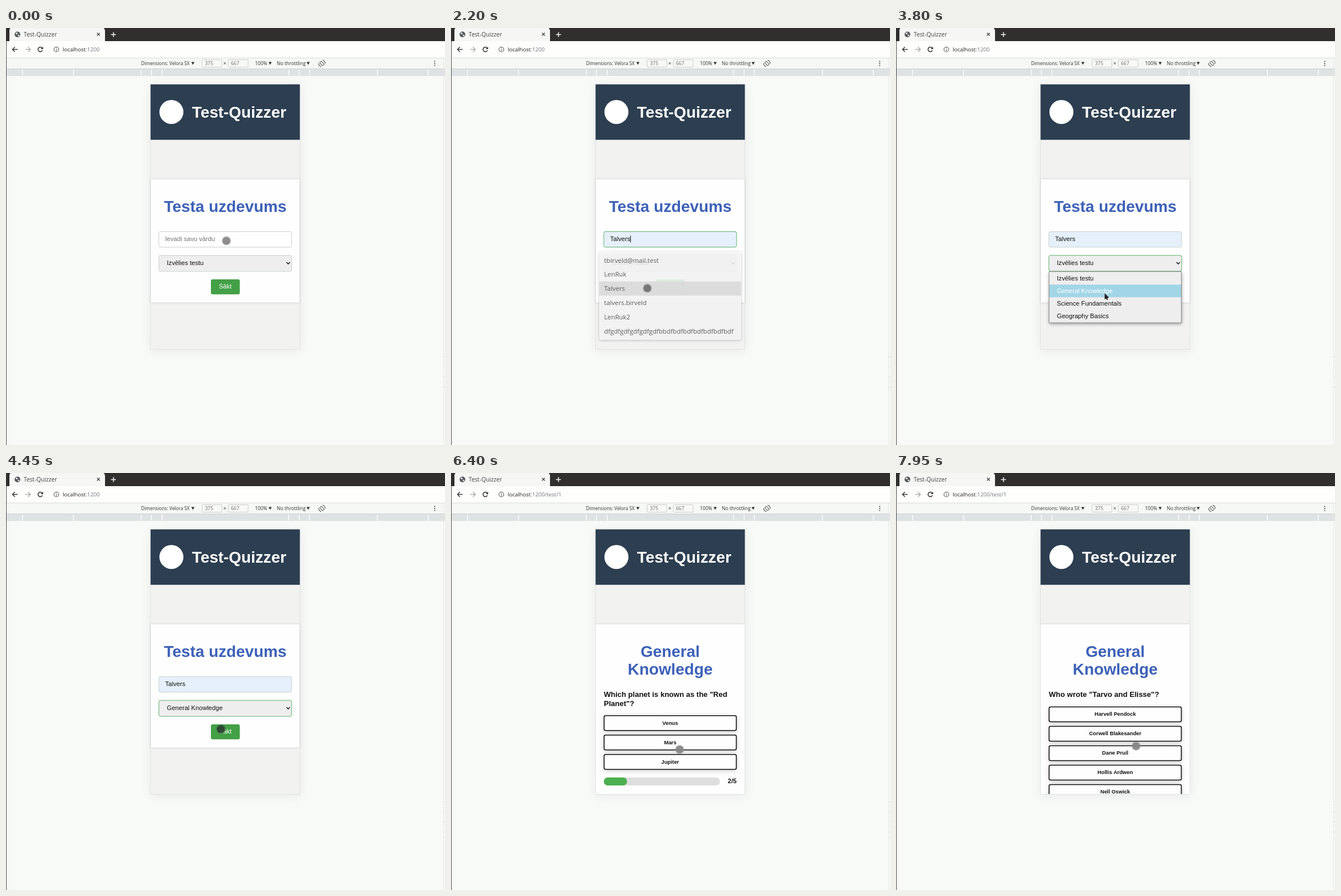
These frames come from a looping animation (767 px wide and 730 px high, 8 s). An HTML page with a canvas:

```html
<!DOCTYPE html>
<html lang="lv">
<head>
<meta charset="utf-8">
<title>Test-Quizzer</title>
<style>
html, body { margin: 0; width: 100%; height: 100%; overflow: hidden; background: #f8faf7; }
canvas { display: block; }
</style>
</head>
<body>
<canvas id="stage" width="767" height="730"></canvas>
<script>
const ctx = document.getElementById('stage').getContext('2d');
const LOOP = 8000, STEP = 50, PRESS = 150;
const W = 767, H = 730, MID = 383;
const LEFT = 267, WIDE = 232;
const EM = 11.12;
const NAME_ROW = 24.85, TEST_ROW = 22.2, ANSWER_ROW = 34;
const PAGE = '"Liberation Sans", Arial, sans-serif';
const UI = '"Open Sans", "Noto Sans", sans-serif';
const INK = '#111', ICON = '#444', WHITE = '#fefefe';
const GREY = [204, 208, 208], FOCUS = [92, 176, 108], SKY = [162, 214, 231], PALE = [238, 238, 238];

const USER = 'Talvers';
const NAMES = ['tbirveld@mail.test', 'LenRuk', USER, 'talvers.birveld', 'LenRuk2',
  'dfg'.repeat(5) + 'dfbb' + 'dfb'.repeat(6) + 'df'];
const TESTS = ['Izvēlies testu', 'General Knowledge', 'Science Fundamentals', 'Geography Basics'];
const QUIZ = [
  { ask: ['What is the capital of France?'], answers: ['Berlin', 'Madrid', 'Paris', 'Rome'] },
  { ask: ['Which planet is known as the "Red', 'Planet"?'], answers: ['Venus', 'Mars', 'Jupiter'] },
  { ask: ['Who wrote "Tarvo and Elisse"?'],
    answers: ['Harvell Pendock', 'Corwell Blakesander', 'Dane Pruil', 'Hollis Ardwen', 'Nell Oswick'] }
];

// Moments of the story, in ms
const T = { focus: 550, pick: 2150, open: 2750, hover: 3800, choose: 4000, go: 4400,
  quiz: 4600, answer: 6050, second: 6400, third: 7550 };

const clamp = v => Math.max(0, Math.min(1, v));
const ramp = (t, from, length) => clamp((t - from) / length);
const ease = k => k * k * (3 - 2 * k);
const mix = (a, b, k) => `rgb(${a.map((v, i) => Math.round(v + (b[i] - v) * k))})`;

// Each move runs along a slightly bowed line to the next resting place
function pointerAt(t) {
  let p = { x: 385, y: 372.5 };
  const move = (from, length, x, y) => {
    const k = ease(ramp(t, from, length)), bow = 0.15 * Math.sin(Math.PI * k);
    const dx = x - p.x, dy = y - p.y;
    p = { x: p.x + dx * k + dy * bow, y: p.y + dy * k - dx * bow };
  };
  move(0, 200, 392, 374);
  move(1100, 450, 343, 455.5);
  move(2350, 250, 357, 421);
  move(2950, 450, 349, 459);
  move(3600, 250, 366, 466);
  move(4150, 300, 375.5, 448.5);
  move(5000, 350, 398, 422.5);
  move(5350, 450, 399.5, 484);
  move(6550, 250, 410, 456);
  move(6900, 350, 399.5, 475);
  move(7700, 250, 419.5, 478);
  return p;
}

function rect(x, y, w, h, color) {
  ctx.fillStyle = color;
  ctx.fillRect(x, y, w, h);
}

function stroke(color, width) {
  ctx.strokeStyle = color;
  ctx.lineWidth = width;
  ctx.stroke();
}

function box(x, y, w, h, r, fill, edge, width = 1) {
  ctx.beginPath();
  ctx.roundRect(x, y, w, h, r);
  if (fill) {
    ctx.fillStyle = fill;
    ctx.fill();
  }
  if (edge) {
    ctx.shadowColor = 'transparent';
    stroke(edge, width);
  }
}

function shadowed(blur, dy, alpha, draw) {
  ctx.save();
  ctx.shadowColor = `rgba(0,0,0,${alpha})`;
  ctx.shadowBlur = blur;
  ctx.shadowOffsetY = dy;
  draw();
  ctx.restore();
}

function text(str, x, y, size, color, { font = PAGE, weight = 400, align = 'left' } = {}) {
  ctx.font = `${weight} ${size}px ${font}`;
  ctx.textAlign = align;
  ctx.fillStyle = color;
  ctx.fillText(str, x, y);
}

const ui = (str, x, y, size, color = '#333', weight = 400) =>
  text(str, x, y, size, color, { font: UI, weight });
const bold = (str, x, y, size, color = INK, align = 'left') =>
  text(str, x, y, size, color, { weight: 700, align });

function line(points, color, width = 1.4) {
  ctx.beginPath();
  points.forEach(([x, y]) => ctx.lineTo(x, y));
  stroke(color, width);
}

function poly(points, color) {
  ctx.beginPath();
  points.forEach(([x, y]) => ctx.lineTo(x, y));
  ctx.fillStyle = color;
  ctx.fill();
}

function disc(x, y, r, color) {
  ctx.beginPath();
  ctx.arc(x, y, r, 0, Math.PI * 2);
  ctx.fillStyle = color;
  ctx.fill();
}

function arc(x, y, r, from, to, color, width = 1.1) {
  ctx.beginPath();
  ctx.arc(x, y, r, from, to);
  stroke(color, width);
}

const triangle = (x, y, r, h, color) => poly([[x - r, y], [x + r, y], [x, y + h]], color);

function cross(x, y, r, turn, color, width) {
  for (const a of [turn, turn + Math.PI / 2]) {
    const dx = r * Math.cos(a), dy = r * Math.sin(a);
    line([[x - dx, y - dy], [x + dx, y + dy]], color, width);
  }
}

function arrow(x, y, dir, color) {
  const tip = x + dir * 4.6;
  line([[x - dir * 4.5, y], [tip, y]], color);
  line([[tip - dir * 4.2, y - 4.2], [tip, y], [tip - dir * 4.2, y + 4.2]], color);
}

function tabStrip() {
  rect(0, 0, W, 23, '#302f2e');
  box(6, -1, 167, 25, [5, 6, 0, 0], '#f6f7f5');
  disc(20, 11.2, 5, '#55585a');
  disc(18.6, 9.4, 1.7, '#dfe1e0');
  disc(22, 13, 1.6, '#dfe1e0');
  ui('Test-Quizzer', 31, 14.7, 10.1, ICON);
  cross(161.5, 11, 3.6, Math.PI / 4, ICON, 1.2);
  cross(187.7, 11.5, 4.3, 0, '#f4f4f4', 1.5);
}

function addressBar(path) {
  rect(0, 23, W, 29, '#fefffd');
  arrow(16, 37.5, -1, '#333');
  arrow(38, 37.5, 1, '#aaa');
  arc(60, 37.5, 4, 0.4, 5.5, '#333', 1.5);
  poly([[64.8, 32.8], [64.8, 37], [60.6, 37]], '#333');
  arc(88, 37.5, 4.2, 0, 7, '#555');
  rect(87.5, 37, 1.1, 3, '#555');
  rect(87.5, 34.8, 1.1, 1.2, '#555');
  ui('localhost', 99, 41, 9.6, '#222');
  ui(path, 99 + ctx.measureText('localhost').width, 41, 9.6, '#70757a');
}

function deviceBar() {
  rect(0, 52, W, 1, '#d9dcda');
  rect(0, 53, W, 18, '#f6f8f5');
  ui('Dimensions: Velora SX', 236, 65, 8.2);
  ui('100%', 435, 65, 8.5);
  ui('No throttling', 473, 65, 8.5);
  for (const x of [326.5, 461.5, 528]) triangle(x, 59.5, 2.8, 5, '#333');
  ['375', '667'].forEach((size, i) => {
    box(342.5 + i * 46, 55.5, 34.5, 13, 1, '#f8f9f7', '#c8cccb');
    ui(size, 347.5 + i * 45.5, 65, 8.5, '#666');
  });
  ui('×', 379.7, 65.3, 9);
  ctx.save();
  ctx.translate(552, 62);
  ctx.rotate(-Math.PI / 4);
  box(-2, -3.8, 4, 7.6, 1, null, '#555');
  for (const a of [0, Math.PI]) arc(0, 0, 5.8, a - 0.6, a + 0.9, '#555');
  ctx.restore();
  for (const dy of [-3.5, 0, 3.5]) disc(749, 62 + dy, 1, ICON);

  rect(0, 71, W, 1, '#cfd3d2');
  rect(0, 72, W, 12, '#dee2e2');
  for (const d of [110.5, 129, 147, 265.5, 354.5])
    for (const side of [-1, 1]) rect(MID - 0.5 + side * d, 73, 1.5, 10, '#fbfcfb');
}

function browser(path) {
  rect(0, 0, W, H, '#f8faf7');
  tabStrip();
  addressBar(path);
  deviceBar();
  rect(764, 53, 1, H, '#e5e8e6');
  for (let i = 0; i < 4; i++) rect(765, 575 + i * 17.7, 2, 1, '#d5d8d6');
  rect(0, 23, 1, H, '#4c4a49');
}

function phone() {
  shadowed(18, 2, 0.07, () => rect(252.5, 98.5, 261, 464, '#f2f2f1'));
  box(252.5, 98.5, 261, 464, 0, '#f2f2f1', '#dfe4e4');
  rect(252.6, 98.7, 260.8, 97, '#2c3e50');
  disc(289, 147, 21, '#fff');
  bold('Test-Quizzer', 325, 156.6, 27.8, '#fff');
}

const panel = h => shadowed(4, 0, 0.15, () => rect(253, 265, 260, h, WHITE));
const title = (str, row = 0) => bold(str, MID, 321.7 + row * 31.2, 27.8, '#3d61b8', 'center');
const field = (y, h, fill, edge) => box(LEFT, y, WIDE, h, 3, fill, edge);

function hoveredName(t) {
  if (t < 1200 || t >= 2350) return -1;
  return Math.min(2, Math.floor((pointerAt(t).y - 394) / NAME_ROW));
}

function nameList(t) {
  const alpha = ramp(t, T.focus - STEP, 200) * (1 - ramp(t, T.pick, 200) ** 1.5);
  if (!alpha) return;
  ctx.save();
  ctx.globalAlpha = alpha;
  shadowed(4, 1, 0.25, () => box(259, 391, 248, 155, 3, '#fafafa'));
  triangle(272.5, 391.5, 6.5, -6, '#fafafa');
  const row = hoveredName(t);
  if (row >= 0) rect(259, 394 + row * NAME_ROW, 248, NAME_ROW, '#dadada');
  NAMES.forEach((name, i) => ui(name, 267.5, 410.5 + i * NAME_ROW, 11.3, '#484848', 500));
  ctx.restore();
}

function testList(t) {
  if (t <= T.open || t >= T.choose) return;
  shadowed(6, 2, 0.4, () => box(267.5, 426.5, 231, 89.5, 0, '#eee', '#8a8a8a'));
  const active = t < T.hover ? 0 : 1;
  rect(268, 427 + active * TEST_ROW, 230, TEST_ROW, mix(SKY, SKY, 0));
  TESTS.forEach((name, i) => text(name, 281, 441.5 + i * TEST_ROW, EM, i === active ? '#fff' : INK));
}

function nameField(t) {
  const row = hoveredName(t);
  const value = t >= T.pick ? USER : NAMES[row] || '';
  const focus = ramp(t, T.focus - STEP, 200) * (1 - ramp(t, T.open + STEP, 300));
  field(356.4, 27.2, value ? '#e5f0fa' : WHITE, mix(GREY, FOCUS, focus));
  text(value || 'Ievadi savu vārdu', 278, 373, EM, value ? INK : '#757575');
  if (t >= T.focus && t < 2600)
    rect(278 + (value && ctx.measureText(value).width), 363.5, 1, 12, INK);
}

function testField(t) {
  const pressed = ramp(t, T.open - STEP, 150) * (1 - ramp(t, T.open + 250, 250));
  const focus = ramp(t, T.open + 200, 300);
  field(398, 28, mix(PALE, SKY, pressed), mix(GREY, FOCUS, focus));
  text(TESTS[t < T.choose ? 0 : 1], 281, 415.3, EM, mix([17, 17, 17], [52, 86, 100], pressed));
  line([[490, 410], [493, 413], [496, 410]], '#222', 1.6);
}

function startPage(t) {
  panel(215.5);
  title('Testa uzdevums');
  nameField(t);
  testField(t);
  box(358, 440, 50.5, 26.3, 3, '#43a047');
  text('Sākt', MID, 456.3, EM, '#fff', { align: 'center' });
  nameList(t);
  testList(t);
}

function quizPage(index) {
  const { ask, answers } = QUIZ[index];
  ctx.save();
  ctx.beginPath();
  ctx.rect(253, 260, 260, 302);
  ctx.clip();
  panel(330);
  title('General');
  title('Knowledge', 1);
  ask.forEach((str, i) => bold(str, LEFT, 392 + i * 15.5, 13));

  let y = 409 + (ask.length - 1) * 15.3;
  for (const answer of answers) {
    shadowed(9, 2, 0.22, () => box(LEFT + 0.5, y + 0.5, WIDE - 1, 26, 2.5, WHITE, INK, 1.6));
    bold(answer, MID, y + 16.4, 9.27, INK, 'center');
    y += ANSWER_ROW;
  }

  y += 6.8;
  box(LEFT, y, 203, 13.8, 7, '#dedede');
  if (index) box(LEFT, y, 203 * index / QUIZ_LENGTH, 13.8, 7, '#4caf50');
  bold(`${index + 1}/${QUIZ_LENGTH}`, LEFT + WIDE, y + 9.8, EM, INK, 'right');
  ctx.restore();
}
const QUIZ_LENGTH = 5;

function pointer(t) {
  const { x, y } = pointerAt(t);
  if (t >= T.open - STEP && t < T.choose) {
    line([[x + 2, y + 5], [x + 5, y + 11.5]], '#222', 2);
    poly([[x, y], [x, y + 10.5], [x + 7.4, y + 7.4]], '#222');
    return;
  }
  const down = [T.focus, T.pick, T.go, T.answer].some(p => t >= p && t < p + PRESS);
  const onButton = down && t < T.quiz && t >= T.go;
  disc(x, y, 8, onButton ? 'rgba(50,80,55,.6)' : 'rgba(150,150,150,.55)');
  disc(x, y, 6.6, onButton ? 'rgba(42,62,48,.85)' : down ? 'rgba(112,112,112,.9)' : 'rgba(132,132,132,.88)');
}

function draw(t) {
  const started = t >= T.quiz;
  browser(started ? ':1200/test/1' : ':1200');
  phone();
  if (started) quizPage((t >= T.second) + (t >= T.third));
  else startPage(t);
  pointer(t);
}

const begin = performance.now();
function tick() {
  const t = (performance.now() - begin) % LOOP;
  draw(Math.floor(t / STEP) * STEP);
  requestAnimationFrame(tick);
}
tick();
</script>
</body>
</html>
```
